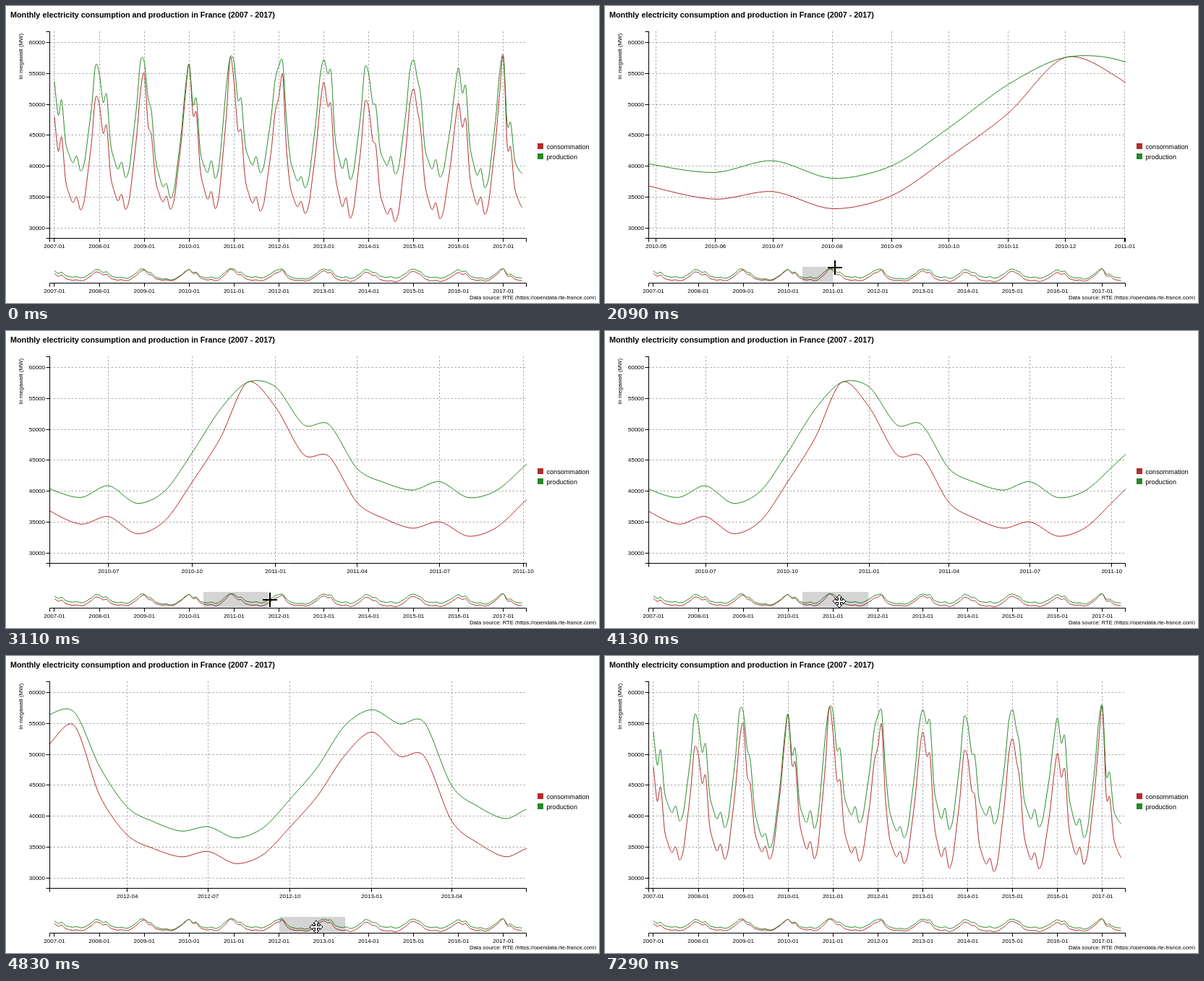
Recreate the animation shown at these times as an HTML page with a canvas. Size 820 px wide and 411 px high, loop 8150 ms.

```html
<!DOCTYPE html>
<html lang="en">
<head>
<meta charset="utf-8">
<title>Monthly electricity consumption and production</title>
<style>
html, body { margin: 0; width: 100%; height: 100%; overflow: hidden; background: #fff; }
canvas { display: block; }
</style>
</head>
<body>
<canvas id="stage" width="820" height="411"></canvas>
<script>
const c = document.getElementById('stage').getContext('2d');
const FONT = '"Liberation Sans", Arial, sans-serif';
const LOOP = 8150, DAY = 864e5, START = Date.UTC(2007, 0, 1);
const LEFT = 60.5, RIGHT = 720, TOP = 35, BOTTOM = 322, SUB_TOP = 361, SUB_BOTTOM = 383.5;
const RED = '#b22d2b', GREEN = '#258a25';
const MONTHS = 126;

const mix = (a, b, p) => a + (b - a) * p;
const clamp = v => Math.max(0, Math.min(1, v));

// Values in hundreds of megawatts. Each year is shaped by January, February, March, August, December
const years = [
  [480, 424, 447, 329, 510], [500, 453, 465, 330, 521], [549, 467, 449, 330, 514],
  [565, 483, 485, 331, 576], [536, 459, 456, 327, 486], [512, 547, 433, 323, 497],
  [536, 497, 497, 316, 503], [494, 443, 431, 310, 500], [525, 490, 457, 315, 462],
  [502, 463, 475, 322, 518], [577, 432, 430, 322, 500]];
const consumption = years.flatMap(([jan, feb, mar, aug, dec]) => [
  jan, feb, mar,
  ...[0.42, 0.22, 0.1, 0.18].map(p => mix(aug, mar, p)),
  aug,
  ...[0.085, 0.34, 0.63].map(p => mix(aug, dec, p)),
  dec]).slice(0, MONTHS);

// Surplus every half year; it vanishes when demand peaks
const surplus = [57, 66, 50, 52, 48, 20, 10, 50, 45, 65, 50, 40, 50, 64, 55, 84, 47, 70, 57, 46, 30, 60];
const production = consumption.map((v, m) => {
  const i = Math.floor(m / 6);
  return v + mix(surplus[i], surplus[i + 1], m % 6 / 6) * clamp((565 - v) / 40);
});

const monthDay = m => (Date.UTC(2007, m, 1) - START) / DAY;
const LAST = monthDay(MONTHS - 1), PAD = LAST / 100;
const FULL = [-PAD, LAST + PAD];
const scaleX = ([a, b]) => d => mix(LEFT, RIGHT, (d - a) / (b - a));
const dayAt = x => mix(...FULL, (x - LEFT) / (RIGHT - LEFT));
const mainY = v => 50.5 + (600 - v) * 0.855;
const subY = v => mix(SUB_TOP, SUB_BOTTOM, (618 - v) / 335.5);
const crisp = v => Math.floor(v) + 0.5;

// Pointer path: time, x, y
const path = [
  [460, 308, 392], [1250, 273, 364], [1400, 273, 366], [1500, 273, 366], [2090, 317.6, 362],
  [2630, 353.3, 368], [3190, 366.5, 373], [3350, 366.5, 373], [3980, 324, 374], [4130, 324, 374],
  [4830, 428.9, 375], [5300, 462.2, 375], [5460, 462.2, 375], [5710, 531, 384], [6170, 541, 375],
  [7020, 541, 375], [7230, 649, 389]];

function pointerAt(t) {
  const i = path.findIndex(k => k[0] > t);
  if (i < 1) return path.at(i).slice(1);
  const a = path[i - 1], b = path[i], p = (t - a[0]) / (b[0] - a[0]);
  return [mix(a[1], b[1], p), mix(a[2], b[2], p)];
}

// The brush is drawn first, then dragged along by the pointer
function brushAt(t, x) {
  if (t < 1570 || t >= 6570) return null;
  if (t < 3430) return [273, Math.min(364.2, x - 2.3)];
  const shift = t < 4130 ? 0 : Math.min(x, 462.2) - 324;
  return [273 + shift, 364.2 + shift];
}

// Picks the calendar unit that gives about ten ticks
function ticks([a, b]) {
  const goal = (b - a) / 10;
  const off = u => Math.abs(Math.log(goal / u));
  const unit = [1, 2, 7, 30, 90, 365].reduce((p, q) => off(q) < off(p) ? q : p);
  const list = [];
  if (unit < 30) {
    for (let d = Math.ceil(a); d <= b; d++) if ((d + 1) % unit === 0) list.push(d);
  } else {
    for (let m = 0; m < MONTHS; m += Math.round(unit / 30)) {
      const d = monthDay(m);
      if (d >= a && d <= b) list.push(d);
    }
  }
  return list;
}

function line(x1, y1, x2, y2) {
  c.beginPath();
  c.moveTo(x1, y1);
  c.lineTo(x2, y2);
  c.stroke();
}

function text(s, x, y, size, align = 'left', weight = '') {
  c.font = `${weight} ${size}px ${FONT}`;
  c.textAlign = align;
  c.fillStyle = '#000';
  c.fillText(s, x, y);
}

// Cardinal spline with tension 0.7
function curve(data, x, y, color) {
  const pts = data.map((v, m) => [x(monthDay(m)), y(v)]), n = pts.length;
  const slope = i => {
    const a = pts[Math.max(0, i - 1)], b = pts[Math.min(n - 1, i + 1)];
    return [0.15 * (b[0] - a[0]), 0.15 * (b[1] - a[1])];
  };
  c.beginPath();
  c.moveTo(...pts[0]);
  for (let i = 1; i < n; i++) {
    const [px, py] = pts[i - 1], [qx, qy] = pts[i], s = slope(i - 1), e = slope(i);
    c.bezierCurveTo(px + s[0], py + s[1], qx - e[0], qy - e[1], qx, qy);
  }
  c.strokeStyle = color;
  c.stroke();
}

function curves(x, y, top, bottom) {
  c.save();
  c.beginPath();
  c.rect(LEFT, top, RIGHT - LEFT, bottom - top);
  c.clip();
  c.lineWidth = 1;
  curve(consumption, x, y, RED);
  curve(production, x, y, GREEN);
  c.restore();
}

function axisX(x, list, y) {
  c.strokeStyle = '#000';
  line(LEFT, y, RIGHT, y);
  for (const px of [LEFT, RIGHT - 0.5]) line(px, y, px, y + 5);
  for (const d of list) {
    const px = x(d);
    line(crisp(px), y, crisp(px), y + 5);
    text(new Date(START + d * DAY).toISOString().slice(0, 7), px, y + 13, 8, 'center');
  }
}

function mainChart(domain) {
  const x = scaleX(domain), list = ticks(domain);
  c.lineWidth = 1;
  c.strokeStyle = '#aaa';
  c.setLineDash([2.5, 2.5]);
  for (const d of list) line(crisp(x(d)), TOP, crisp(x(d)), BOTTOM);
  for (let v = 300; v <= 600; v += 50) line(LEFT, crisp(mainY(v)), RIGHT, crisp(mainY(v)));
  c.setLineDash([]);
  curves(x, mainY, TOP, BOTTOM);
  axisX(x, list, BOTTOM - 0.5);
  line(LEFT, TOP, LEFT, BOTTOM);
  for (const y of [TOP + 0.5, BOTTOM - 0.5]) line(LEFT - 5, y, LEFT, y);
  for (let v = 300; v <= 600; v += 50) {
    const y = crisp(mainY(v));
    line(LEFT - 5, y, LEFT, y);
    text(v * 100, 54, y + 2.8, 8, 'right');
  }
}

function labels() {
  text('Monthly electricity consumption and production in France (2007 - 2017)', 6, 15.5, 10.8, 'left', 'bold');
  c.save();
  c.translate(23, 38);
  c.rotate(-Math.PI / 2);
  text('In megawatt (MW)', 0, 0, 7.8, 'right');
  c.restore();
  [['consommation', RED], ['production', GREEN]].forEach(([name, color], i) => {
    c.fillStyle = color;
    c.fillRect(735, 190 + i * 14, 8, 8);
    text(name, 747.5, 198 + i * 14, 9.1);
  });
  text('Data source: RTE (https://opendata.rte-france.com)', 816, 406, 7.7, 'right');
  c.fillStyle = '#fff';
  c.fillRect(630, 406.5, 190, 5);
}

function cross() {
  c.lineWidth = 2;
  line(-10, 0, 10, 0);
  line(0, -10, 0, 10);
}

function outline(pts) {
  c.beginPath();
  pts.forEach(p => c.lineTo(...p));
  c.closePath();
  c.fill();
  c.stroke();
}

function moveSign() {
  const arm = [[-1.5, -1.5], [-1.5, -5], [-4, -5], [0, -9], [4, -5], [1.5, -5]];
  const turn = ([x, y]) => [-y, x];
  const pts = [];
  for (let q = 0, part = arm; q < 4; q++, part = part.map(turn)) pts.push(...part);
  outline(pts);
}

function arrow() {
  outline([[0, 0], [0, 16], [3.7, 12.6], [6.3, 18.4], [8.6, 17.4], [6.1, 11.6], [11, 11.4]]);
}

function pointer(t, x, y) {
  if (t < 460 || t >= 7285) return;
  c.save();
  c.translate(Math.round(x), Math.round(y));
  c.strokeStyle = '#000';
  c.fillStyle = '#fff';
  c.lineWidth = 1;
  if (t >= 3430 && x < 502) moveSign();
  else if (y > 386 || t >= 7090) arrow();
  else cross();
  c.restore();
}

function draw(now) {
  const t = now % LOOP, [x, y] = pointerAt(t), brush = brushAt(t, x);
  c.fillStyle = '#fff';
  c.fillRect(0, 0, 820, 411);
  mainChart(brush ? brush.map(dayAt) : FULL);
  const subX = scaleX(FULL);
  curves(subX, subY, SUB_TOP, SUB_BOTTOM);
  if (brush) {
    c.fillStyle = 'rgba(0,0,0,0.17)';
    c.fillRect(brush[0], SUB_TOP, brush[1] - brush[0], SUB_BOTTOM - SUB_TOP - 1);
  }
  axisX(subX, ticks(FULL), SUB_BOTTOM);
  labels();
  pointer(t, x, y);
}

function frame() {
  draw(performance.now());
  requestAnimationFrame(frame);
}
frame();
</script>
</body>
</html>
```
